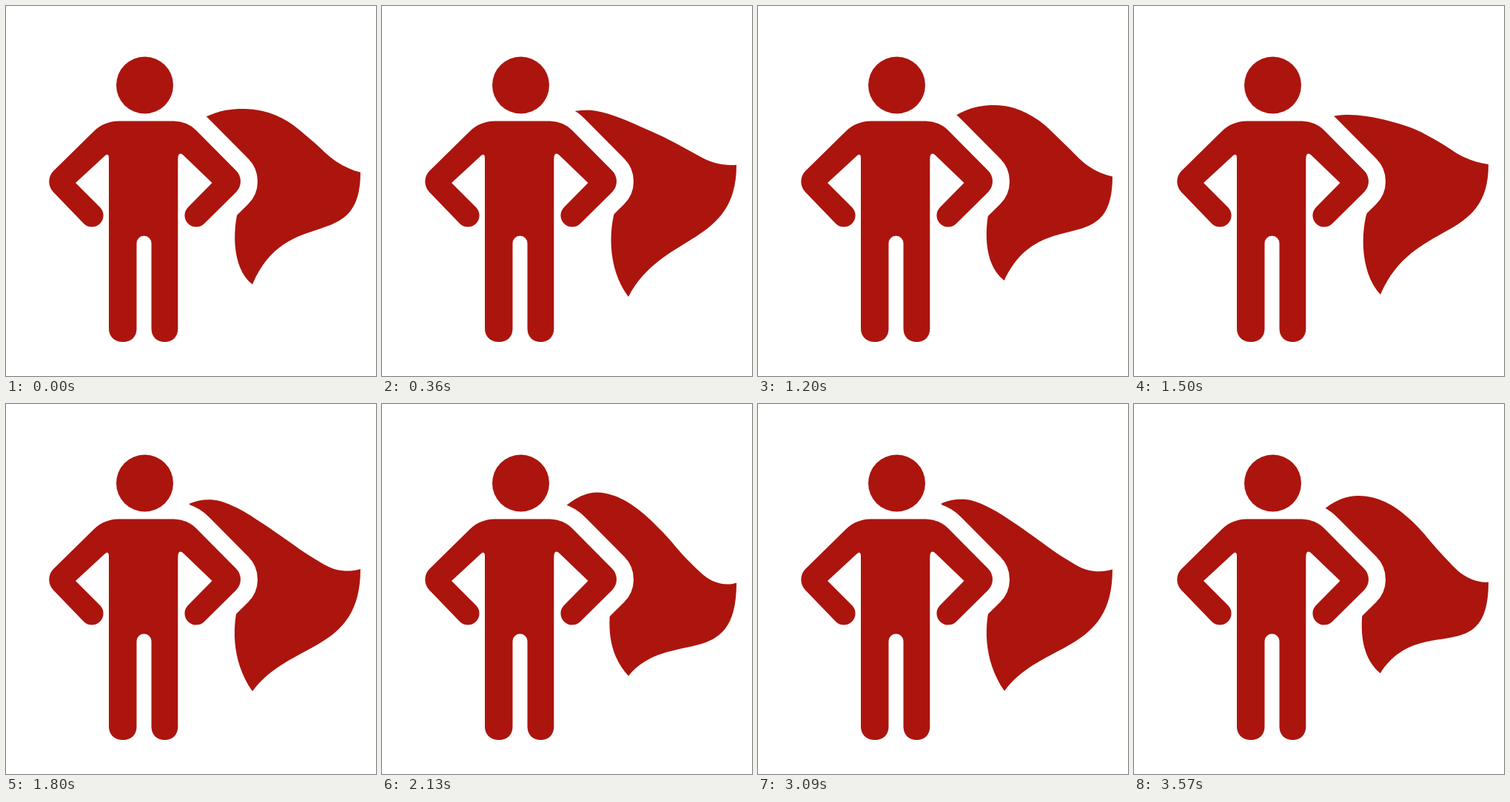
Write an HTML page that moves like this. It is 500 px wide and 500 px high and loops after 3.6 s.

```html
<!DOCTYPE html>
<html lang="en">
<head>
<meta charset="utf-8">
<title>Caped figure</title>
<style>
  html, body { margin: 0; width: 100%; height: 100%; overflow: hidden; background: #fff; }
  svg { display: block; width: 100vw; height: 100vh; }
  .ink { fill: #ab150e; }
  .gap { fill: #fff; stroke: #fff; stroke-width: 46; stroke-linejoin: round; }
</style>
</head>
<body>
<svg viewBox="0 0 500 500">
  <defs>
    <path id="body" d="M152 155.500H227Q245 156 257 168L311 222.500A20.500 20.500 0 0 1 311 251.500L268 294A15.500 15.500 0 0 1 246 272L278.500 239L240 202Q233 195.500 232.300 206V436C232.300 447 225 454 214.500 454S196.500 447 196.500 436V320.500A10 10 0 0 0 176.500 320.500V436C176.500 447 169 454 158 454S139 447 139 436V206Q139 197.500 133 203L94 239L127 272A15.500 15.500 0 0 1 105 294L64 251.500A20.500 20.500 0 0 1 64 223L119 169Q132 156 152 155.500Z"/>
  </defs>
  <path id="cape" class="ink"/>
  <use href="#body" class="gap"/>
  <use href="#body" class="ink"/>
  <circle class="ink" cx="187.500" cy="107" r="38.500"/>
</svg>
<script>
  const LOOP = 3600, STEP = 30, WAVE = 1280;
  const LEFT = 248, GAP = 33;

  // Evenly spaced points of the upper edge: mean height, swing, phase in degrees.
  const crest = [
    [147, 15.7, 4], [134, 14.5, 39], [136.4, 13.1, 78], [149.2, 13.6, 122],
    [170, 15, 164], [197.3, 17, 202], [221.5, 17.6, 229], [228, 14.4, 257]
  ];

  const cape = document.getElementById('cape');

  // Smooth curve through evenly spaced heights.
  function curve(ys) {
    const last = ys.length - 1;
    const rise = ys.map((y, i) => (ys[i + 1] - ys[i - 1]) / 2);
    rise[0] = 2 * (ys[1] - ys[0]) - rise[1];
    rise[last] = 2 * (ys[last] - ys[last - 1]) - rise[last - 1];
    let d = `M${LEFT} ${ys[0]}`;
    for (let i = 0; i < last; i++) {
      const x = LEFT + i * GAP;
      d += `C${x + GAP / 3} ${ys[i] + rise[i] / 3} ${x + GAP * 2 / 3} ${ys[i + 1] - rise[i + 1] / 3} ${x + GAP} ${ys[i + 1]}`;
    }
    return d;
  }

  function capePath(t) {
    const sway = (mean, swing, phase) =>
      mean + swing * Math.cos(2 * Math.PI * (t / WAVE - phase / 360));
    const upper = curve(crest.map(point => sway(...point)));
    const lower = `C479 ${sway(343, 21, 252)} ${sway(383, 5, 235)} ${sway(293.5, 27.8, 166)} 333 ${sway(378.5, 14.5, 99)}`;
    const inner = `C303 ${sway(346, 11.4, 52)} 306 295 ${sway(314.8, 5, 65)} 265`;
    return upper + lower + inner + 'L296 238L248 178Z';
  }

  function draw() {
    const now = performance.now() % LOOP;
    cape.setAttribute('d', capePath(Math.floor(now / STEP) * STEP));
    requestAnimationFrame(draw);
  }
  draw();
</script>
</body>
</html>
```
